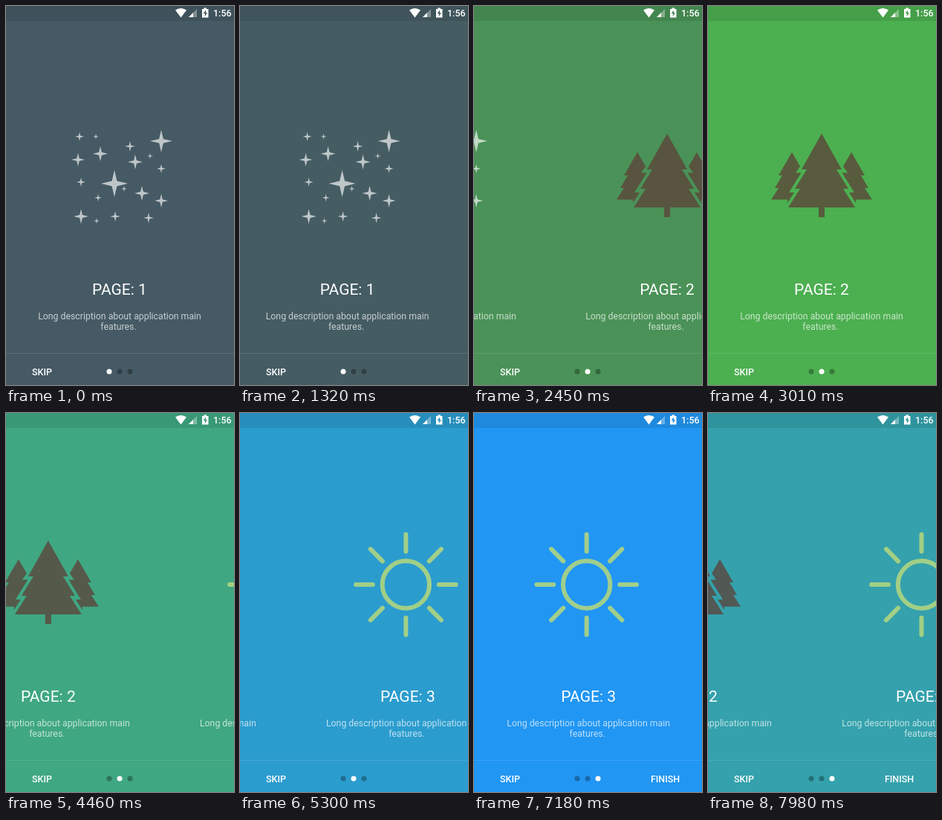
Write an HTML page that moves like this. It is 307 px wide and 508 px high and loops after 8 s.

```html
<!DOCTYPE html>
<html lang="en">
<head>
<meta charset="utf-8">
<title>Intro slider</title>
<style>
  html, body { margin: 0; width: 100%; height: 100%; overflow: hidden; }
  svg { display: block; width: 307px; height: 508px; font-family: Roboto, sans-serif; fill: #fff; }
  .title { font-size: 21px; text-anchor: middle; }
  .note { font-size: 12.3px; text-anchor: middle; fill-opacity: .7; }
  .bold { font-weight: 500; font-size: 12.5px; }
  #sun { fill: none; stroke: #aed581; stroke-width: 6; stroke-linecap: round; opacity: .9; }
</style>
</head>
<body>
<svg viewBox="0 0 307 508">
  <rect id="back" width="307" height="508"/>
  <g id="pages">
    <g><g id="stars" opacity=".65"></g></g>
    <g>
      <g fill="#5d4037" opacity=".75">
        <path d="M153 171L180 219H173L189 245H182L198 270H157V283H149V270H108L124 245H117L133 219H126Z"/>
        <path id="side" d="M113 196L124 215 118 223.500H125.500L109 250H116L107 264V259.500H85L95 244H90L100 227H95Z"/>
        <use href="#side" transform="translate(306) scale(-1 1)"/>
      </g>
    </g>
    <g><g id="sun" transform="translate(150.500 230)"><circle r="31.700"/></g></g>
  </g>
  <rect width="307" height="20" fill="#000" opacity=".09"/>
  <path d="M228 5.500Q235.500 .5 243 5.500L235.500 15.500Z"/>
  <path d="M257 4V15H246Z" opacity=".35"/>
  <path d="M252 9V15H246Z"/>
  <path fill-rule="evenodd" d="M264 4H266.500V2.500H270V4H272.500V15.500H264ZM269 5.500L265.700 10H267.800V14L271 9.200H269Z"/>
  <text class="bold" x="279" y="14">1:56</text>
  <rect y="465" width="307" height="1" opacity=".12"/>
  <text class="bold" x="48.500" y="494.500" text-anchor="middle">SKIP</text>
  <text class="bold" id="finish" x="257.500" y="494.500" text-anchor="middle">FINISH</text>
  <g id="dots"></g>
</svg>
<script>
const $ = id => document.getElementById(id);
const add = (parent, tag, attrs, text = '') => {
  const el = document.createElementNS('http://www.w3.org/2000/svg', tag);
  for (const k in attrs) el.setAttribute(k, attrs[k]);
  el.textContent = text;
  return parent.appendChild(el);
};

const colors = [[69, 90, 100], [76, 175, 80], [33, 150, 243]];
const pageX = [0, 313, 627];
const pages = [...$('pages').children];

// x, y, radius
const stars = [
  [99, 175, 6], [121, 175, 4], [209, 181, 15], [127, 198, 10], [167, 188, 7],
  [194, 201, 4], [97, 206, 9], [174, 209, 10], [209, 218, 6], [101, 236, 6],
  [146, 238, 18], [159, 245, 4], [183, 251, 10], [124, 257, 5], [209, 261, 9],
  [101, 282, 10], [122, 288, 4], [147, 282, 7], [192, 284, 7]
];
for (const [x, y, r] of stars)
  add($('stars'), 'path', {
    d: 'M0-1L.19-.19 1 0 .19 .19 0 1-.19 .19-1 0-.19-.19Z',
    transform: `translate(${x} ${y}) scale(${r})`
  });

for (let a = 0; a < 360; a += 45)
  add($('sun'), 'path', { d: 'M0-44.500V-67.300', transform: `rotate(${a})` });

const dots = pages.map((page, i) => {
  add(page, 'text', { class: 'title', x: 153, y: 387 }, 'PAGE: ' + (i + 1));
  add(page, 'text', { class: 'note', x: 153, y: 420 }, 'Long description about application main');
  add(page, 'text', { class: 'note', x: 151.5, y: 434 }, 'features.');
  return add($('dots'), 'circle', { cx: 139 + 14 * i, cy: 490, r: 3.5 });
});

// time, scroll; a third value marks a decelerating settle up to that key
const keys = [
  [0, 0], [1270, 0], [1920, 107], [2450, 205], [3010, 313, 1],
  [3990, 313], [4460, 409], [5300, 554], [5350, 562], [5880, 626, 1],
  [7180, 626], [7980, 490], [8000, 490]
];

function scrollAt(t) {
  const i = keys.findIndex(k => k[0] > t);
  const [t0, x0] = keys[i - 1], [t1, x1, settle] = keys[i];
  const u = (t - t0) / (t1 - t0);
  return x0 + (x1 - x0) * (settle ? 1 - (1 - u) ** 5 : u);
}

function draw(now) {
  const t = now % 8000;
  const x = scrollAt(t);
  const p = x / 313, i = Math.min(1, Math.floor(p));
  const mix = colors[i].map((c, n) => Math.round(c + (colors[i + 1][n] - c) * (p - i)));
  $('back').setAttribute('fill', `rgb(${mix})`);
  pages.forEach((g, n) => g.setAttribute('transform', `translate(${pageX[n] - x})`));

  const selected = t < 2450 ? 0 : t < 5350 ? 1 : 2;
  dots.forEach((d, n) => {
    d.setAttribute('fill', n === selected ? '#fff' : '#000');
    d.setAttribute('opacity', n === selected ? 1 : .3);
  });
  $('finish').setAttribute('visibility', selected === 2 ? 'visible' : 'hidden');
}

const start = performance.now();
function loop() {
  draw(performance.now() - start);
  requestAnimationFrame(loop);
}
loop();
</script>
</body>
</html>
```
